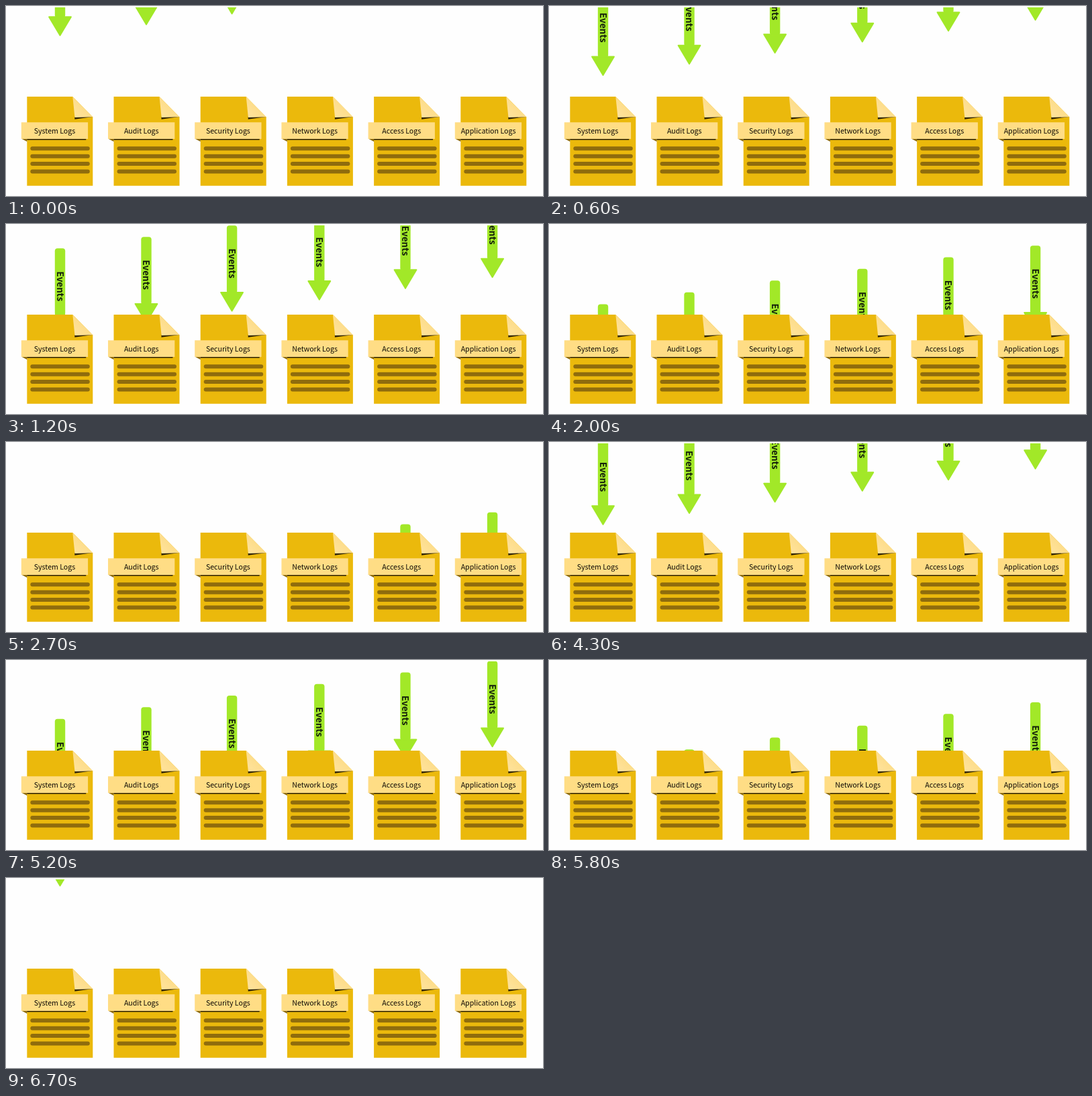
Write an HTML page that moves like this. It is 800 px wide and 283 px high and loops after 6800 ms.

```html
<!DOCTYPE html>
<html lang="en">
<head>
<meta charset="utf-8">
<title>Log events</title>
<style>
  html, body { margin: 0; width: 100%; height: 100%; overflow: hidden; background: #fefefe; }
  svg { display: block; width: 800px; height: 283px; }
  text { font-family: "Noto Sans CJK JP", "Noto Sans CJK SC", "Open Sans", sans-serif; }
  .label { font-size: 10.6px; text-anchor: middle; fill: #0c0a04; }
  .event { font-size: 13.5px; font-weight: 700; fill: #14200a; }
  .arrow { fill: #a2e828; stroke: #a2e828; stroke-width: 2; stroke-linejoin: round; }
</style>
</head>
<body>
<svg viewBox="0 0 800 283">
  <defs>
    <clipPath id="sky"><rect y="2" width="800" height="134"/></clipPath>
    <linearGradient id="flap" x1="0" y1="1" x2="1" y2="0">
      <stop offset="0" stop-color="#ffe4a0"/>
      <stop offset="1" stop-color="#fbd676"/>
    </linearGradient>
    <g id="doc">
      <path d="M0 135H68L98 165.5V267.7H0Z" fill="#ebb90c"/>
      <path d="M71 165H98L71 168.8Z" fill="#2e2303"/>
      <path d="M68 135L98 165.3L71.2 166Z" fill="url(#flap)"/>
      <path d="M-8.5 197.5H0V202Z" fill="#8f6c0d"/>
      <path d="M0 197H88V199.6H0Z" fill="#2a2005"/>
      <path d="M-8.5 173.3H90.8V198H-8.5Z" fill="#ffdd85"/>
      <path d="M8 212.2H90.5M8 223.7H90.5M8 235.1H90.5M8 246.5H90.5"
            stroke="#8f6c0d" stroke-width="6" stroke-linecap="round"/>
    </g>
    <!-- Arrow with its tip at the origin -->
    <g id="arrow">
      <path class="arrow" d="M0 -1.2L-16.4 -28.7H16.4Z"/>
      <rect x="-7.7" y="-128.5" width="15.4" height="101" rx="4" fill="#a2e828"/>
      <text class="event" transform="translate(-4.6 -94.2) rotate(90)">Events</text>
    </g>
  </defs>
  <g id="arrows" clip-path="url(#sky)"></g>
  <g id="docs"></g>
</svg>
<script>
const LOOP = 6800, STEP = 100;
const STAGGER = 167.8;
const STARTS = [0, 3502, 7034];
const LABELS = ["System", "Audit", "Security", "Network", "Access", "Application"];
const CENTERS = [80.5, 209, 336.6, 466.8, 595, 724.6];

function add(parent, tag, attrs) {
  const el = document.createElementNS("http://www.w3.org/2000/svg", tag);
  for (const key in attrs) el.setAttribute(key, attrs[key]);
  return parent.appendChild(el);
}

const docs = document.getElementById("docs");
const arrowLayer = document.getElementById("arrows");

LABELS.forEach((name, i) => {
  const x = 31.3 + 129.2 * i;
  add(docs, "use", { href: "#doc", x });
  add(docs, "text", { class: "label", x: x + 41.2, y: 190 }).textContent = name + " Logs";
});

const arrows = CENTERS.map(() => add(arrowLayer, "use", { href: "#arrow" }));

// The fall speeds up slightly on the way down.
function tipAt(ms) {
  const u = ms / 100;
  return 45 + 9.73 * u + 0.0208 * u * u;
}

function draw(time) {
  const t = Math.floor((time % LOOP) / STEP) * STEP;
  arrows.forEach((arrow, i) => {
    // Each run begins above the stage, a little before its start mark.
    const run = STARTS.filter(s => t - s - i * STAGGER > -700).pop();
    const tip = run === undefined ? -10 : tipAt(t - run - i * STAGGER);
    arrow.setAttribute("transform", `translate(${CENTERS[i]} ${tip.toFixed(2)})`);
  });
}

const begin = performance.now();
function tick() {
  draw(performance.now() - begin);
  requestAnimationFrame(tick);
}
tick();
</script>
</body>
</html>
```
